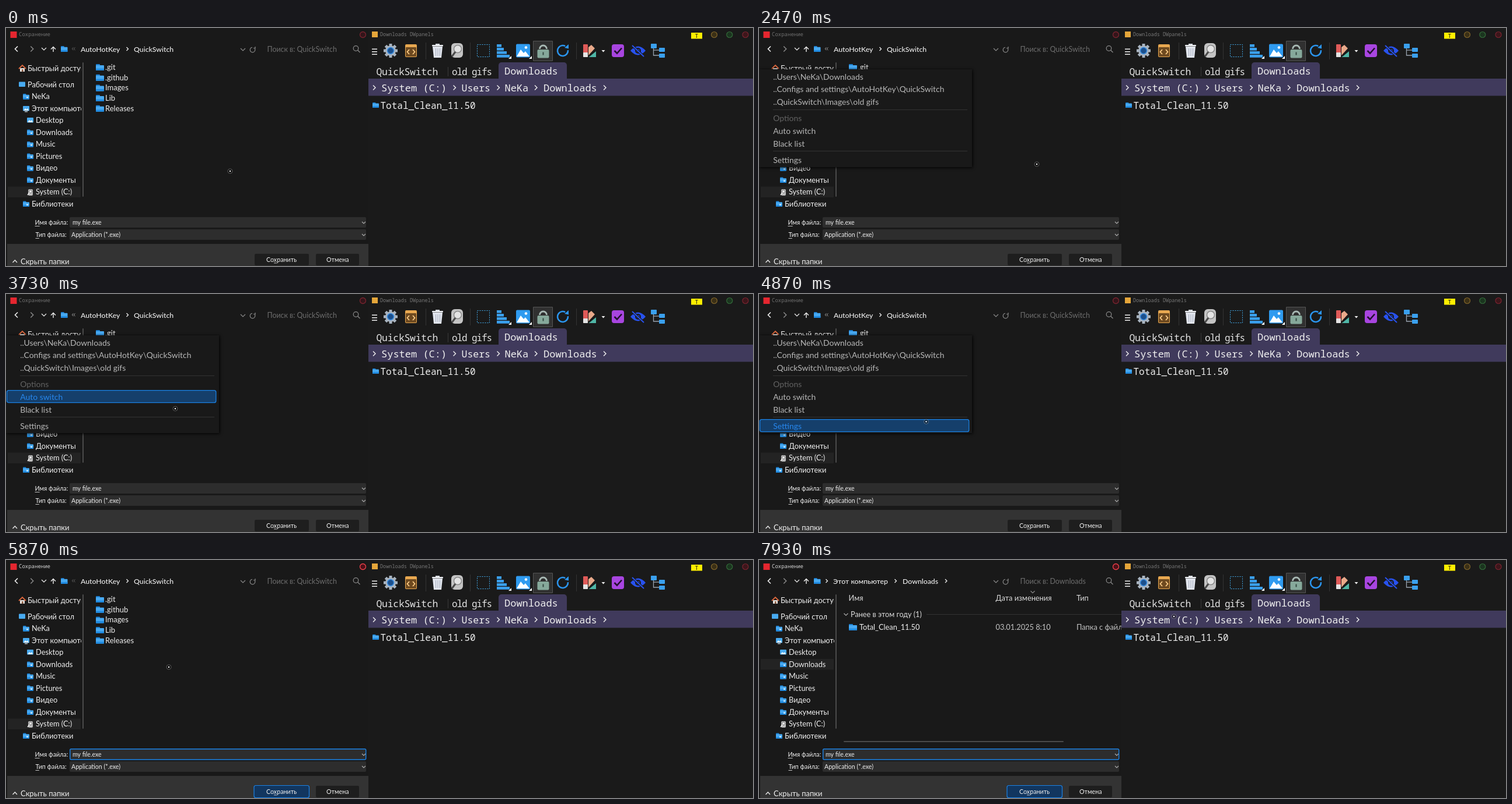
An HTML page with a canvas for the animation above (8000 ms loop, 1280 by 409 pixels).

```html
<!DOCTYPE html>
<html lang="ru">
<head>
<meta charset="utf-8">
<style>
html, body { margin: 0; height: 100%; overflow: hidden; background: #191919; }
canvas { display: block; }
</style>
</head>
<body>
<canvas id="stage" width="1280" height="409"></canvas>
<script>
const ctx = document.getElementById('stage').getContext('2d');
const LOOP = 8000, STEP = 200 / 3;
const SANS = 'Lato, "Open Sans", sans-serif', MONO = '"Noto Sans Mono", monospace';
const BLUE = '#3aa0ee', ACCENT = '#1a82e6', WHITE = '#f0f0f0';

// Pointer path: step, x, y
const PATH = [
  [0, 384, 246], [1, 437, 254], [6, 437, 254], [8, 457, 266], [12, 457, 266],
  [17, 497, 253], [18, 497, 253], [20, 503, 249], [22, 503, 249], [25, 557, 240],
  [27, 476, 234], [42, 476, 234], [46, 320, 226], [48, 292, 184], [49, 291, 180],
  [55, 291, 180], [56, 290, 197], [59, 288, 226], [72, 288, 226], [78, 279, 186],
  [79, 279, 184], [102, 279, 184], [107, 560, 132], [110, 770, 96], [112, 835, 86],
  [115, 811, 97], [119, 711, 97]
];
const MENU = [
  ['..Users\\NeKa\\Downloads', 84], ['..Configs and settings\\AutoHotKey\\QuickSwitch', 105.5],
  ['..QuickSwitch\\Images\\old gifs', 127.5], ['Options', 155.5],
  ['Auto switch', 177], ['Black list', 199], ['Settings', 227]
];
const SIDEBAR = [
  ['Быстрый доступ', 37, 70, 'home'], ['Рабочий стол', 37, 97.5, 'desk'], ['NeKa', 44, 118],
  ['Этот компьютер', 44, 139, 'pc'], ['Desktop', 51, 159, 'pic'], ['Downloads', 51, 179.5],
  ['Music', 51, 200], ['Pictures', 51, 220.5], ['Видео', 51, 241], ['Документы', 51, 261.5],
  ['System (C:)', 51, 282, 'disk'], ['Библиотеки', 44, 302.5]
];

function rect(x, y, w, h, fill, r = 0, stroke, width = 1) {
  ctx.beginPath();
  ctx.roundRect(x, y, w, h, r);
  if (fill) { ctx.fillStyle = fill; ctx.fill(); }
  if (stroke) { ctx.strokeStyle = stroke; ctx.lineWidth = width; ctx.stroke(); }
}
function circle(x, y, r, fill, stroke, width = 1) {
  rect(x - r, y - r, 2 * r, 2 * r, fill, r, stroke, width);
}
function line(points, color, width = 1.2, fill) {
  ctx.beginPath();
  for (let i = 0; i < points.length; i += 2) ctx.lineTo(points[i], points[i + 1]);
  if (fill) { ctx.fillStyle = fill; ctx.fill(); }
  if (color) { ctx.strokeStyle = color; ctx.lineWidth = width; ctx.stroke(); }
}
function arc(x, y, r, from, to, color, width) {
  ctx.beginPath();
  ctx.arc(x, y, r, from, to);
  ctx.strokeStyle = color; ctx.lineWidth = width; ctx.stroke();
}
// y is the middle of the line of text
function text(str, x, y, size, color = WHITE, font = SANS, spacing = 0, weight = 400) {
  ctx.font = `${weight} ${size}px ${font}`;
  ctx.letterSpacing = spacing + 'px';
  ctx.fillStyle = color;
  ctx.fillText(str, x, y + size * 0.35);
}
function underlined(str, x, y, size, at) {
  text(str, x, y, size);
  const left = x + ctx.measureText(str.slice(0, at)).width;
  rect(left, y + 5.5, ctx.measureText(str[at]).width, 0.8, WHITE);
}
function down(x, y, color, s = 4) { line([x - s, y - s / 2, x, y + s / 2, x + s, y - s / 2], color); }
function right(x, y, color, s = 4, width = 1.3) { line([x - s / 2, y - s, x + s / 2, y, x - s / 2, y + s], color, width); }
function folder(x, y, w, h) {
  rect(x, y, w * 0.5, h, '#1b7fd0', 1);
  rect(x, y + h * 0.18, w, h * 0.82, '#47a9f2', 1);
  rect(x, y + h * 0.7, w, h * 0.3, '#1f8ae0', 1);
}
function clipped(x, y, w, h, paint) {
  ctx.save();
  ctx.beginPath(); ctx.rect(x, y, w, h); ctx.clip();
  paint();
  ctx.restore();
}

function sideIcon(kind, x, y) {
  if (kind === 'home') {
    rect(x + 2, y - 1, 8, 6, '#e6e0dc');
    line([x, y, x + 6, y - 6, x + 12, y], '#d9663c', 1.8);
    rect(x + 5, y + 1, 2.5, 4, '#8a5a40');
  } else if (kind === 'disk') {
    rect(x + 2, y - 5, 8, 11, '#bdbdbd', 2);
    circle(x + 6, y - 1, 2.6, '#e8e8e8', '#777');
    line([x + 4, y + 1, x + 1, y + 5], '#eee', 1.5);
  } else if (kind) {
    rect(x, y - 5, 11, 8.5, '#48aaf0', 1);
    if (kind !== 'desk') line([x + 1, y + 3, x + 4, y - 1, x + 6, y + 1, x + 8, y - 1, x + 10, y + 3], null, 1, '#e4f3ff');
    if (kind === 'pc') rect(x + 3, y + 4, 5, 1.5, '#bbb');
  } else {
    folder(x, y - 5, 11, 9.5);
    rect(x + 6, y, 3, 2.5, '#c9e8ff');
  }
}

function drawSidebar(inDownloads) {
  rect(3, inDownloads ? 170 : 272.5, 125, 18.5, '#232323');
  clipped(0, 50, 129, 270, () => {
    for (const [name, x, y, kind] of SIDEBAR) {
      sideIcon(kind, x - 15, y);
      text(name, x, y, 12.8);
    }
  });
  rect(131, 59, 2, 231, '#4a4a4a', 1);
}

function drawNavigation(inDownloads, n, menuOpen) {
  line([20, 31.5, 15.5, 36, 20, 40.5], WHITE, 1.6);
  right(44.5, 36, '#8a8a8a', 4.5, 1.5);
  down(65, 36, WHITE);
  line([81, 41, 81, 32.5], WHITE, 1.4);
  line([77, 36.5, 81, 32.5, 85, 36.5], WHITE, 1.4);
  folder(94, 31, 11.5, 10);
  const crumb = (str, x) => text(str, x, 36.5, 12.3, WHITE, SANS, 0, 500);
  if (inDownloads) {
    right(116, 36, WHITE, 3);
    crumb('Этот компьютер', 127);
    right(234, 36, WHITE, 3);
    crumb('Downloads', 246);
    if (n >= 98) right(320.5, 36, WHITE, 3);
  } else {
    for (const x of [113, 116]) line([x + 2.5, 33.5, x, 35.7, x + 2.5, 38], menuOpen ? '#aaa' : '#666', 1);
    crumb('AutoHotKey', 128);
    right(208, 36, WHITE, 3);
    crumb('QuickSwitch', 219);
  }
  down(406, 37, '#8a8a8a');
  arc(422.5, 37.5, 4.3, -0.4, 4.6, '#8a8a8a', 1.2);
  line([424, 34.5, 427, 35, 427, 32], '#8a8a8a');
  text('Поиск в: ' + (inDownloads ? 'Downloads' : 'QuickSwitch'), 447.5, 36.5, 12.4, '#6e6e6e');
  circle(599.5, 35, 4.3, null, '#8a8a8a', 1.2);
  line([602.5, 38, 606.5, 42], '#8a8a8a');
}

function drawFiles(inDownloads) {
  if (!inDownloads) {
    ['.git', '.github', 'Images', 'Lib', 'Releases'].forEach((name, i) => {
      const y = 67.5 + i * 17.7;
      folder(154, y - 5.5, 14, 11);
      text(name, 170, y, 13);
    });
    return;
  }
  text('Имя', 153.5, 66, 12.8, '#ddd');
  text('Дата изменения', 405.5, 66, 12.8, '#ddd');
  text('Тип', 544, 66, 12.8, '#ddd');
  down(469, 55, '#8a8a8a', 3.5);
  down(149, 93.5, '#aaa', 3.5);
  text('Ранее в этом году (1)', 157, 93.5, 12.7, '#ddd');
  rect(287, 93, 334, 1, '#333');
  folder(154, 110, 14, 11);
  text('Total_Clean_11.50', 172, 116, 12.8);
  text('03.01.2025 8:10', 405.5, 116, 12.8, '#c4c4c4');
  clipped(540, 100, 81, 30, () => text('Папка с файлами', 544, 116, 12.8, '#c4c4c4'));
  rect(145, 311, 377, 2, '#4a4a4a', 1);
}

function drawForm(active, caret) {
  underlined('Имя файла:', 49.5, 334.5, 10.7, 0);
  underlined('Тип файла:', 50.5, 355.5, 10.7, 0);
  rect(109, 325, 508, 18, '#2d2d2d', 2);
  rect(109, 346, 508, 18, '#2d2d2d', 2);
  if (active) rect(109.7, 324.7, 507, 18.3, '#2d2d2d', 2, ACCENT, 1.4);
  text('my file.exe', 114, 334, 10.6);
  text('Application (*.exe)', 112, 355.5, 10.6);
  down(613, 334.5, '#aaa', 3);
  down(613, 355.5, '#aaa', 3);
  if (caret) rect(114, 326, 1, 14, WHITE);

  rect(2, 371, 619, 38, '#333');
  line([11.5, 403, 15.3, 399, 19, 403], WHITE);
  text('Скрыть папки', 25, 401, 13);
  if (active) rect(425, 387.5, 94.5, 21, '#12365f', 3, ACCENT, 1.2);
  else rect(426, 388, 93, 20, '#1e1e1e', 2);
  rect(531, 388, 74, 20, '#1e1e1e', 2);
  underlined('Сохранить', 446, 398, 10.7, 2);
  text('Отмена', 549, 398, 10.7);
}

function drawMenu(hover) {
  ctx.save();
  ctx.shadowColor = '#000'; ctx.shadowBlur = 5; ctx.shadowOffsetX = 1; ctx.shadowOffsetY = 1;
  rect(0, 71, 365, 168, '#191919');
  ctx.restore();
  rect(24, 140, 333, 1, '#333');
  rect(24, 211, 333, 1, '#333');
  MENU.forEach(([label, y], i) => {
    const lit = i !== 3 && hover && hover.x < 361 && Math.abs(hover.y - y) < 11;
    if (lit) rect(1.5, y - 11.3, 358.3, 21, '#153f6b', 3, ACCENT, 1.3);
    text(label, 24.3, y, 13.9, lit ? '#2787ee' : i === 3 ? '#626262' : '#b8b8b8');
  });
}

function drawDialog(n, hover) {
  const menuOpen = n >= 37 && n < 87;
  const active = n >= 87 || (n >= 33 && n < 37);
  const inDownloads = n >= 91;
  rect(0, 0, 621, 409, '#191919');
  rect(7.5, 6, 11, 11, '#e5262f');
  text('Сохранение', 22, 11, 9, active ? '#d8d8d8' : '#707070', MONO);
  circle(611.5, 11.5, 5, active ? '#4c1018' : '#33151a', active ? '#f0424c' : '#7a2430', 1.3);
  drawNavigation(inDownloads, n, menuOpen);
  drawSidebar(inDownloads);
  drawFiles(inDownloads);
  const caret = active && (n < 37 || (n >= 92 && (n - 92) % 16 < 8));
  drawForm(active, caret);
  if (menuOpen) drawMenu(hover);
}

function drawToolbar() {
  for (const y of [35.5, 40, 44.5]) rect(627, y, 9, 1.5, WHITE);
  for (let i = 0; i < 8; i++) {
    const a = i * Math.PI / 4, c = Math.cos(a), s = Math.sin(a);
    line([659 + 6 * c, 39 + 6 * s, 659 + 12 * c, 39 + 12 * s], '#a9b4c0', 5);
  }
  circle(659, 39, 9, '#a9b4c0');
  circle(659, 39, 5.5, '#1b4f8c', '#3b8ee0', 1.5);
  // code
  rect(684, 28, 20, 22, '#e8a850', 2);
  rect(685, 33, 18, 16, '#6e4a20', 1);
  line([691, 37, 687.5, 41, 691, 45], '#ffd08a', 1.7);
  line([697, 37, 700.5, 41, 697, 45], '#ffd08a', 1.7);
  // bin
  line([731, 32, 748, 32, 746, 51, 733, 51], null, 1, '#e2e6ee');
  rect(730, 29, 19, 2.5, '#f2f4f8', 1);
  rect(736, 27, 7, 2, '#d6dae2');
  for (const x of [736, 739.5, 743]) rect(x, 35, 1, 13, '#a4acbc');
  // disk search
  rect(763, 26, 20, 25, '#c4c4c4', 6);
  circle(774, 36, 6.5, '#e4e4e4', '#8a8a8a', 1.5);
  line([770, 41, 764, 49], '#4a4a4a', 3);
  ctx.setLineDash([2, 2]);
  rect(807.5, 28.5, 21, 21, null, 0, '#43aef0', 1);
  ctx.setLineDash([]);
  [8, 12, 17, 22].forEach((w, i) => rect(841, 28 + i * 6, w, 4.7, BLUE));
  // picture
  rect(874, 27.5, 24, 23, '#2f9bf0', 2);
  circle(891, 33.5, 2.3, '#fff');
  line([875, 49, 882, 37, 887, 43, 890, 40, 897, 49], null, 1, '#fff');
  for (const x of [866, 901]) line([x, 48, x, 53, x - 5, 53], null, 1, '#fff');
  // lock
  rect(903.5, 22.5, 33, 34, '#303030', 0, '#555');
  arc(920.5, 36, 6, Math.PI, 0, '#a8b9b4', 2.8);
  rect(910.5, 37, 20, 14.5, '#86a99b', 2);
  rect(919.5, 41.5, 2, 5, '#354a42');
  // refresh
  arc(954, 39, 9, -0.1, 5.2, '#2b95ee', 2.6);
  line([957, 34, 964, 35.5, 964, 28], null, 1, '#2b95ee');
  // swatches
  rect(989, 28, 8, 22, '#df5a58', 1);
  line([998, 33, 1003, 29, 1009, 35, 998, 47], null, 1, '#e9a98a');
  line([1000, 49, 1011, 40, 1011, 50, 998, 50], null, 1, '#4fb6a6');
  rect(989, 42, 8, 8, '#e4e4e4', 1);
  line([1020.5, 38, 1026.5, 38, 1023.5, 41.5], null, 1, WHITE);
  // check
  rect(1038, 28, 21, 22, '#a845e0', 4);
  line([1042.5, 39, 1047, 43.5, 1055, 34.5], '#241030', 2.6);
  // eye
  ctx.beginPath();
  ctx.moveTo(1070, 39); ctx.quadraticCurveTo(1083, 24, 1096, 39); ctx.quadraticCurveTo(1083, 54, 1070, 39);
  ctx.fillStyle = '#2852ee'; ctx.fill();
  circle(1083, 39, 5, '#1a1a1a');
  circle(1083, 39, 2.8, '#2852ee');
  line([1073, 30, 1093, 49], '#1a1a1a', 4);
  line([1073, 30, 1093, 49], '#2852ee', 2);
  // tree
  line([1109.5, 34, 1109.5, 47, 1120, 47], '#9aa4b0', 1.3);
  line([1109.5, 38, 1120, 38], '#9aa4b0', 1.3);
  rect(1105, 27, 10, 8, BLUE, 1);
  rect(1119, 34, 10, 7, BLUE, 1);
  rect(1119, 44, 10, 7, BLUE, 1);
  for (const x of [719, 795, 977]) rect(x, 25, 1, 29, '#333');
}

function drawManager() {
  rect(621, 0, 659, 409, '#1a1a1a');
  rect(627, 6, 10, 10, '#e5a63a');
  text('Downloads DWpanels', 641, 11, 8.5, '#777', MONO);
  rect(1174, 8, 19, 10.5, '#ffee00');
  text('T', 1180.5, 13.5, 9.5, '#111', MONO);
  circle(1213.5, 11.5, 5, '#3b3016', '#80652b', 1.2);
  circle(1239.8, 11.5, 5, '#1b351f', '#346b3a', 1.2);
  circle(1267, 11.5, 5, '#3d161b', '#7a2430', 1.2);
  drawToolbar();
  const purple = '#403a5c';
  rect(844, 59, 117, 32, purple, [5, 5, 0, 0]);
  rect(621, 87, 659, 29.5, purple);
  text('QuickSwitch', 634.5, 75, 16.5, '#e4e4e4', MONO, -0.3);
  rect(757, 67, 1, 16, '#3a3a3a');
  text('old gifs', 764, 75, 16, '#e4e4e4', MONO, -1.1);
  text('Downloads', 854, 74.5, 17, WHITE, MONO);
  for (const x of [631, 768.5, 843.5, 908, 1026]) right(x, 102.5, WHITE, 4, 1.4);
  text('System (C:)', 643, 103, 17, WHITE, MONO);
  text('Users', 780.5, 103, 16.5, WHITE, MONO);
  text('NeKa', 854.5, 103, 17, WHITE, MONO);
  text('Downloads', 921, 103, 17, WHITE, MONO);
  folder(628, 128, 11, 9);
  text('Total_Clean_11.50', 641.5, 133, 16, WHITE, MONO);
}

function pointerAt(n) {
  const i = PATH.findIndex(p => p[0] >= n);
  if (i <= 0) return { x: PATH[0][1], y: PATH[0][2] };
  const [a, ax, ay] = PATH[i - 1], [b, bx, by] = PATH[i];
  const k = (n - a) / (b - a);
  return { x: ax + (bx - ax) * k, y: ay + (by - ay) * k };
}

function draw(now) {
  const n = Math.min(119, Math.floor((now % LOOP + 4) / STEP));
  // The menu highlight trails the pointer by one step
  drawDialog(n, pointerAt(Math.max(0, n - 1)));
  drawManager();
  const { x, y } = pointerAt(n);
  circle(x, y, 4, 'rgba(0,0,0,.35)', 'rgba(255,255,255,.28)');
  circle(x, y, 1.2, '#fff');
  requestAnimationFrame(draw);
}
requestAnimationFrame(draw);
</script>
</body>
</html>
```
